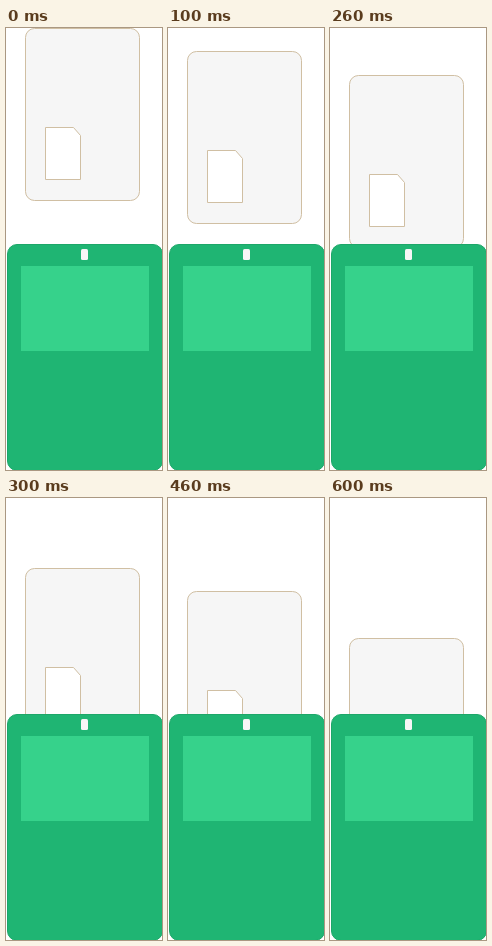
Recreate the animation shown at these times as an HTML page. Size 156 by 442 pixels, loop 700 ms.

```html
<!DOCTYPE html>
<html lang="en">
<head>
<meta charset="utf-8">
<title>Card insert</title>
<style>
  html, body { margin: 0; width: 100%; height: 100%; overflow: hidden; background: #fff; }
  svg { display: block; width: 156px; height: 442px; }
</style>
</head>
<body>
<svg viewBox="0 0 156 442">
  <g id="card" stroke="#d0bfa3">
    <rect x="19.5" y="0.5" width="114" height="172" rx="9" fill="#f6f6f6"/>
    <path d="M39.5 99.5H67.5L74.5 107.5V151.5H39.5Z" fill="#fff"/>
  </g>
  <rect x="1.5" y="216.5" width="155" height="226" rx="9.5" fill="#1fb573" stroke="#1da769"/>
  <rect x="15" y="238" width="128" height="85" fill="#36d28b"/>
  <rect x="75" y="221" width="7" height="11" rx="1.5" fill="#f6f6f6"/>
</svg>
<script>
  const LOOP = 700, STEP = 100, TRAVEL = 140, STEPS = 6;
  const card = document.getElementById('card');
  const start = performance.now();

  // The card slides down at constant speed in discrete ticks, then jumps back.
  function draw(ms) {
    const tick = Math.floor((ms % LOOP) / STEP);
    const y = Math.round(TRAVEL * tick / STEPS);
    card.setAttribute('transform', `translate(0 ${y})`);
  }

  function loop(now) {
    draw(Math.max(0, now - start));
    requestAnimationFrame(loop);
  }

  draw(0);
  requestAnimationFrame(loop);
</script>
</body>
</html>
```
